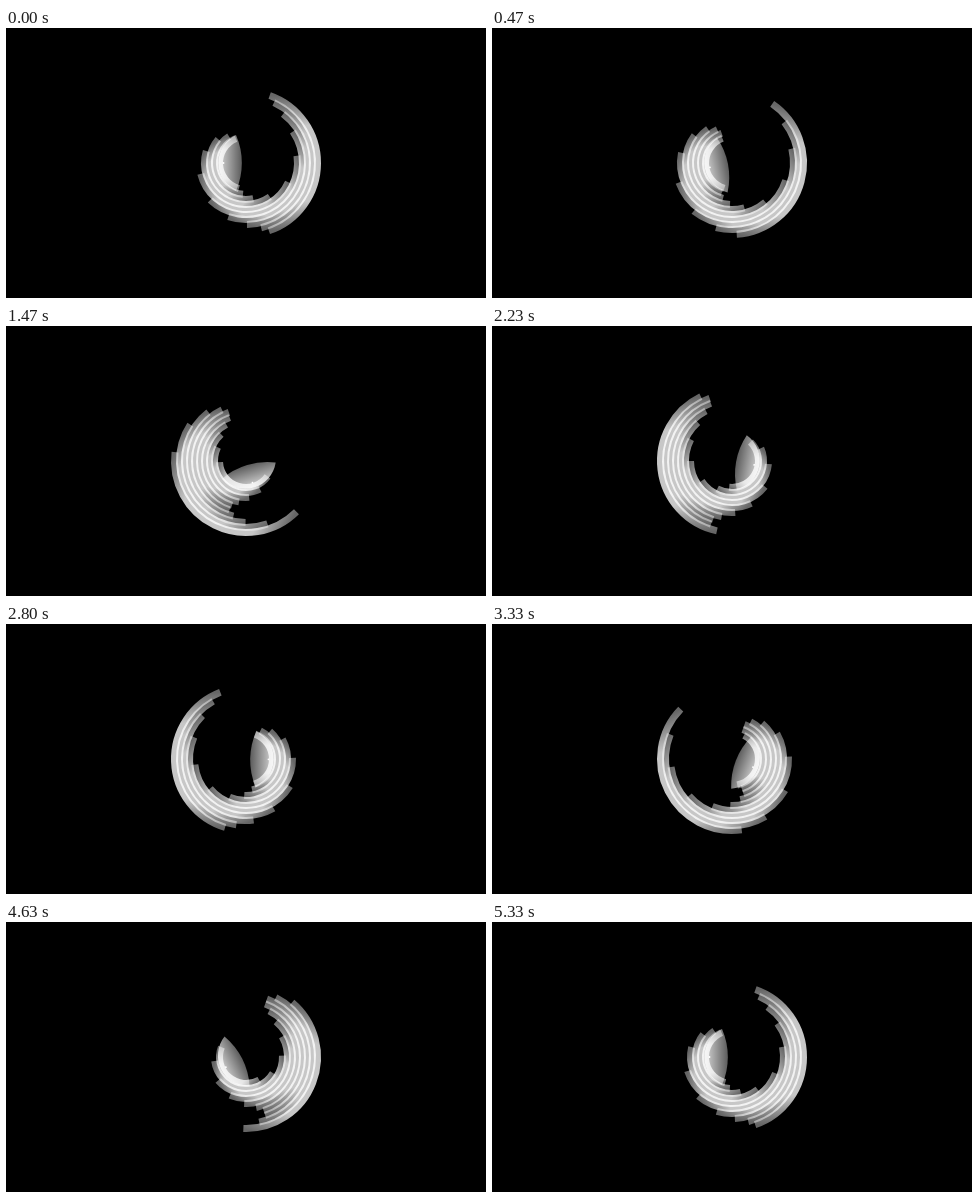
These frames come from a looping animation (480x270 px, 5.36 s). An HTML page:

```html
<!DOCTYPE html>
<html lang="en">
<head>
<meta charset="utf-8">
<title>Swinging arcs</title>
<style>
  html, body { margin: 0; width: 100%; height: 100%; overflow: hidden; background: #000; }
  svg { display: block; width: 100vw; height: 100vh; }
</style>
</head>
<body>
<svg viewBox="0 0 480 270">
  <defs>
    <linearGradient id="fade" x1="0" y1="0" x2="0" y2="1">
      <stop offset="0" stop-color="#fff" stop-opacity=".4"/>
      <stop offset=".22" stop-color="#fff" stop-opacity=".78"/>
      <stop offset=".78" stop-color="#fff" stop-opacity=".78"/>
      <stop offset="1" stop-color="#fff" stop-opacity=".4"/>
    </linearGradient>
    <linearGradient id="glow">
      <stop offset="0" stop-color="#fff" stop-opacity=".36"/>
      <stop offset="1" stop-color="#fff" stop-opacity=".85"/>
    </linearGradient>
  </defs>
  <g id="stage" transform="translate(240 135)"></g>
</svg>
<script>
const LOOP = 5360, HALF = LOOP / 2;
const ARCS = 10, OUTER = 75, PITCH = 5, WIDTH = 7;
const SPAN = 71 * Math.PI / 180;
const LEAD = 80, STAGGER = 260;
const stage = document.getElementById('stage');

function add(parent, tag, attrs) {
  const node = document.createElementNS('http://www.w3.org/2000/svg', tag);
  for (const key in attrs) node.setAttribute(key, attrs[key]);
  return parent.appendChild(node);
}

function makeArc(index) {
  const r = OUTER - PITCH * index - WIDTH / 2;
  const x = r * Math.cos(SPAN), y = r * Math.sin(SPAN);
  return add(stage, 'path', {
    d: `M${x} ${-y}A${r} ${r} 0 0 1 ${x} ${y}`,
    fill: 'none', stroke: 'url(#fade)', 'stroke-width': WIDTH
  });
}

// The innermost part is a soft lens with a bright point.
function makeLens() {
  const group = add(stage, 'g', {});
  add(group, 'path', { d: 'M10 -28A31 31 0 0 1 10 28A70 70 0 0 1 10 -28Z', fill: 'url(#glow)' });
  add(group, 'circle', { cx: 22.5, cy: 0, r: 0.9, fill: '#fff' });
  return group;
}

const lens = makeLens();
const parts = [...Array.from({ length: ARCS }, (_, i) => makeArc(i)), lens];

const ease = u => u < 0.5 ? 2 * u * u : 1 - 2 * (1 - u) ** 2;

function swing(time) {
  const t = time % LOOP;
  return 180 * ease(t < HALF ? t / HALF : 2 - t / HALF);
}

function draw(time) {
  parts.forEach((part, i) =>
    part.setAttribute('transform', `rotate(${swing(time + LEAD + i * STAGGER)})`));
}

const start = performance.now();
function tick() {
  draw(performance.now() - start);
  requestAnimationFrame(tick);
}
tick();
</script>
</body>
</html>
```
